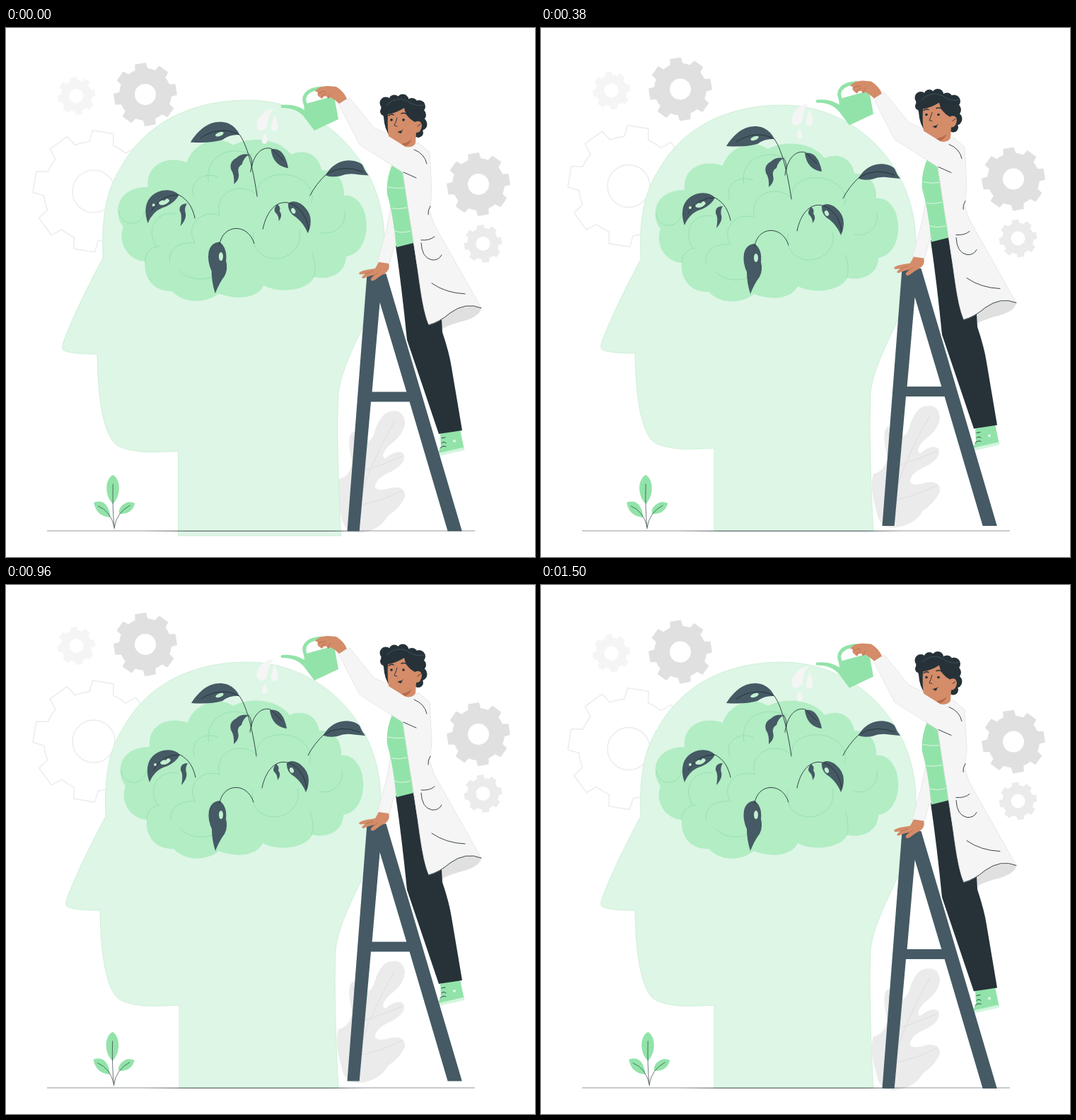
These frames come from a looping animation (748x748 px, 1540 ms). An HTML page:

```html
<!DOCTYPE html>
<html lang="en">
<head>
<meta charset="utf-8">
<title>Watering the mind</title>
<style>
html, body { margin: 0; width: 100%; height: 100%; overflow: hidden; background: #fff; }
svg { display: block; width: 100vw; height: 100vh; }
.line { fill: none; stroke: #263238; stroke-width: .9; stroke-linecap: round; }
.fine { stroke-width: .65; }
.fold { fill: none; stroke: #94dcae; stroke-width: .8; }
.vein { fill: none; stroke: #dcdcdc; stroke-width: .9; }
.leaf { fill: #455a64; }
.spot { fill: #c3f0d1; }
.mint { fill: #92e3a9; }
.skin { fill: #d48c69; }
.ink { fill: #263238; }
.coat { fill: #f5f5f5; stroke: #e2e2e2; stroke-width: .8; }
</style>
</head>
<body>
<svg viewBox="0 0 748 748">
  <g class="float">
    <g id="gears"></g>
    <path fill="#ebebeb" d="M500 714Q478 715 474 690Q464 655 470 638Q485 635 490 615Q481 580 489 572Q498 569 505 580Q512 592 520 575Q527 549 540 543Q562 537 564 558Q563 575 542 590Q528 605 536 609Q553 595 562 602Q567 615 545 627Q521 637 522 650Q528 656 545 650Q565 647 564 663Q557 679 540 690Q528 711 500 714Z"/>
    <path class="vein" d="M488 708Q508 625 550 555M506 626Q532 618 560 606M494 676Q530 670 560 654M508 622Q500 600 490 578"/>
  </g>

  <g id="head">
    <path fill="#def6e6" stroke="#c2ebcf" stroke-width=".7" d="M245 711V594C210 596 185 597 164 588C145 580 134 535 133 460C112 460 96 459 87 455Q83 453 86 444C97 413 122 362 141 327C139 280 143 237 165 203C200 139 265 109 341 109C445 109 530 195 530 304C531 340 526 365 516 387C503 421 470 476 466 516C464 570 466 640 470 711Z"/>
    <path fill="#b2edc4" d="M203 229C200 196 232 185 257 195C265 168 300 156 321 171C345 158 385 162 401 184C421 175 440 185 443 206C465 205 475 222 474 241C491 238 507 258 505 287C503 312 490 323 477 325C477 347 455 359 433 353C425 372 385 377 363 365C355 383 325 386 301 376C283 391 252 390 237 373C211 374 197 355 199 332C175 330 161 306 169 284C154 265 160 229 203 229Z"/>
    <path class="fold" d="M287 222C281 195 305 168 348 184M300 215C276 207 259 224 267 243M302 268C294 236 329 221 352 238M355 240C350 219 380 206 405 214C423 220 434 235 429 251M302 268C276 259 254 284 268 306M215 312C199 287 215 261 243 266M350 290C344 309 356 325 376 328C401 329 418 309 412 288M442 292C460 296 478 283 475 262M268 306C244 304 229 318 234 333M247 345C268 366 308 355 313 332M163 262C166 286 196 284 199 262M430 320C435 334 435 345 432 354M199 332C199 322 205 312 219 311"/>
    <g class="leaf">
      <path d="M262 167C275 147 292 134 314 141Q325 146 330 157Q316 156 306 164Q288 169 262 167Z"/>
      <path d="M373 177Q385 174 392 187Q396 196 397 203Q376 200 373 177Z"/>
      <path d="M343 184Q332 182 325 189Q315 194 318 205Q323 212 322 225Q331 218 328 208Q327 201 333 198Q335 189 343 184Z"/>
      <path d="M449 213C453 203 464 195 474 193C484 191 496 194 500 199Q503 207 508 213Q496 212 488 211Q478 210 468 214Q457 216 449 213Z"/>
      <path d="M203 279C196 260 200 240 222 234Q238 231 246 240Q241 250 228 256Q210 261 203 279Z"/>
      <path d="M257 252Q246 252 247 262Q251 268 248 283Q257 273 255 265Q253 258 257 252Z"/>
      <path d="M397 252Q403 246 414 252Q428 262 428 276Q428 285 424 293Q419 280 408 271Q396 264 397 252Z"/>
      <path d="M382 253Q376 259 379 264Q384 268 384 276Q390 269 385 262Q387 257 382 253Z"/>
      <path d="M302 305Q290 306 287 319Q285 332 291 345Q291 360 296 376Q302 361 309 352Q314 343 311 331Q313 313 302 305Z"/>
    </g>
    <g class="spot">
      <ellipse cx="302" cy="156" rx="6" ry="2.6" transform="rotate(-20 302 156)"/>
      <path d="M218 250Q222 246 226 248Q230 242 233 248Q229 254 222 254Q218 254 218 250Z"/>
      <circle cx="211" cy="254" r="2"/>
      <ellipse cx="404" cy="262" rx="2.8" ry="4" transform="rotate(-25 404 262)"/>
      <ellipse cx="304" cy="325" rx="3" ry="6"/>
    </g>
    <path class="line" d="M276 161Q304 143 330 157C342 174 350 213 354 242M345 208C348 185 360 172 374 176L390 192M343 184Q348 190 347 201M427 241Q435 225 450 211Q473 197 500 208M208 262Q222 239 246 240C259 247 265 258 268 272M362 287C367 262 381 247 398 251C413 255 424 272 425 288M302 309C306 280 341 278 350 307"/>
  </g>

  <g id="sprout">
    <path class="mint" d="M151 632C139 638 139 662 151 673C163 661 162 638 151 632ZM124 671Q134 667 141 674Q147 682 147 692Q127 690 124 671ZM182 672Q172 667 163 676Q158 682 160 687Q178 688 182 672Z"/>
    <path class="line fine" d="M151 645Q150 680 153 708M130 676Q148 683 153 706M175 675Q156 685 153 706"/>
  </g>

  <path class="ink" d="M58 710.8H663V711.2H58ZM115 711L250 710.8H470L605 711L470 711.2H250Z"/>
  <path class="ink" d="M193 711.2L270 711H460L530 711.2L460 711.5H270Z"/>

  <g class="float">
    <path fill="#f5f5f5" d="M379 114C363 116 353 130 355 140C358 149 368 145 370 136C371 127 373 120 379 114ZM380 122C383 132 387 141 382 145C375 148 373 141 376 134ZM366 150C370 156 371 163 366 164C360 164 361 156 366 150Z"/>

    <!-- legs and shoe -->
    <path class="mint" d="M614 574L642 568L648 596L613 604Q610 600 615 592Z"/>
    <path fill="#d3f5de" d="M647 593L648 597L613 605L612 601Z"/>
    <path class="line" d="M616 580L621 579M616 587Q619 584 622 587M614 594Q618 590 622 592"/>
    <circle cx="634" cy="584" r="2" fill="#def6e6"/>
    <path class="ink" d="M551 308L576 303Q584 360 596 405L616 409L617 430Q627 460 630 480L645 569L612 574L567 441Q560 370 551 308Z"/>

    <!-- coat, shirt and arms -->
    <path class="coat" d="M546 243L538 285L525 331L542 334L551 301V258Z"/>
    <path class="mint" d="M546 193Q537 215 539 235Q547 262 552 310L576 304Q569 240 561 202Z"/>
    <path fill="none" stroke="#def6e6" d="M540 225Q552 228 563 226M545 255Q555 257 567 254M549 287Q560 291 572 287"/>
    <path fill="#e0e0e0" d="M672 396Q671 407 648 414Q631 418 617 425V408Q645 389 672 396Z"/>
    <path class="coat" d="M486 99L520 141L575 166L583 162L599 176L602 232L599 258L605 277L672 396Q650 387 628 403Q613 416 598 420Q591 405 585 362Q578 310 571 270L561 204L500 165L470 107Z"/>
    <path class="line" d="M577 172Q592 178 595 192M562 204L580 212M587 300Q599 301 606 295M587 304Q588 325 602 328Q612 329 616 321M602 361Q622 375 649 376M597 264Q596 258 600 252M598 420Q613 416 628 403Q650 387 672 396"/>

    <!-- face -->
    <g class="ink" id="curls">
      <path d="M530 112L548 100L586 112L590 140L583 155L570 142L543 153Q535 143 534 126Z"/>
    </g>
    <path class="skin" d="M540 122Q552 120 563 113Q565 126 578 133Q587 129 588 138Q587 148 580 148L579 163Q575 170 565 168L541 153Q539 140 540 122Z"/>
    <path fill="#b86b4b" d="M559 164Q569 162 574 157Q571 165 564 167Z"/>
    <path fill="none" stroke="#455a64" stroke-width=".8" d="M538 109Q552 96 567 103Q579 112 591 109"/>
    <path class="line" d="M553 127Q551 134 549 138L553 139M554 147Q558 149 561 144M582 139L586 136"/>
    <path class="line" style="stroke-width:1.5" d="M541 124Q545 121 548 123M559 121Q564 119 568 123"/>
    <path class="ink" d="M555 146L560 145Q560 149 557 149Z"/>
    <circle class="ink" cx="545" cy="130" r="1.8"/>
    <circle class="ink" cx="562" cy="130" r="1.8"/>

    <!-- watering can -->
    <path fill="none" stroke="#92e3a9" stroke-width="5" d="M425 111C417 98 424 86 447 85"/>
    <path class="mint" d="M421 108L464 96L470 129L436 145L424 129C416 117 405 113 390 113Q387 111 390 109Q408 107 422 116Z"/>
    <path class="skin" d="M437 89Q443 82 455 82L467 83Q478 90 482 100L471 107Q465 101 459 98L455 100Q454 95 449 97Q447 102 444 98Q439 95 441 91Z"/>
    <path fill="none" stroke="#b86b4b" stroke-width=".8" d="M442 92L452 89M446 97L453 92M455 99L459 92"/>

    <!-- ladder -->
    <path fill="#455a64" fill-rule="evenodd" d="M510.5 347.6H537.5L644.8 711.6H624.6L570.6 528.6H516L499.7 711.6H482.5ZM528.6 388L517.6 514.6H566.3Z"/>
    <path class="skin" d="M527 331L541 333Q544 341 536 347Q529 350 522 356Q515 360 516 354L521 349Q512 351 506 354Q501 354 505 350L509 347Q500 350 499 347Q500 344 510 342L522 340Z"/>
    <path fill="none" stroke="#b86b4b" stroke-width=".8" d="M507 348L519 344M519 351L526 346"/>
  </g>
</svg>
<script>
const LOOP = 1540;
const floats = document.querySelectorAll(".float");
const head = document.getElementById("head");
const sprout = document.getElementById("sprout");

function ring(cx, cy, r) {
  return `M${cx - r} ${cy}a${r} ${r} 0 1 0 ${2 * r} 0a${r} ${r} 0 1 0 ${-2 * r} 0Z`;
}

// eight teeth; tilt is the angle of one tooth in degrees
function gear(cx, cy, r, hole, tilt, paint) {
  const at = (deg, rad) => {
    const a = deg * Math.PI / 180;
    return (cx + rad * Math.cos(a)).toFixed(1) + " " + (cy + rad * Math.sin(a)).toFixed(1);
  };
  const root = r * 0.82;
  let d = "";
  for (let i = 0; i < 8; i++) {
    const a = tilt + i * 45;
    d += `${i ? "L" : "M"}${at(a - 14, root)}L${at(a - 10, r)}L${at(a + 10, r)}L${at(a + 14, root)}`;
    d += `A${root} ${root} 0 0 1 ${at(a + 31, root)}`;
  }
  return `<path fill-rule="evenodd" ${paint} d="${d}Z${ring(cx, cy, hole)}"/>`;
}

document.getElementById("gears").innerHTML =
  gear(124, 231, 86, 30, -81, 'fill="#fff" stroke="#ebebeb" stroke-width="1.4"') +
  gear(197, 94, 45, 15, -99, 'fill="#e0e0e0"') +
  gear(99.5, 96, 27, 10, -99, 'fill="#f5f5f5"') +
  gear(668, 221, 45, 15, -99, 'fill="#e0e0e0"') +
  gear(674.5, 305, 27, 10, -99, 'fill="#ebebeb"');

const curls = [[537, 106, 8.5], [549, 102, 7.5], [561, 102, 8.5], [574, 107, 8],
  [584, 111, 9], [585, 123, 9], [586, 136, 9.5], [583, 148, 7], [535, 118, 6]];
document.getElementById("curls").innerHTML +=
  curls.map(([x, y, r]) => `<circle cx="${x}" cy="${y}" r="${r}"/>`).join("");

// cubic-bezier(.25, .1, .25, 1)
function ease(x) {
  if (x <= 0) return 0;
  if (x >= 1) return 1;
  let lo = 0, hi = 1, s = x;
  for (let i = 0; i < 20; i++) {
    s = (lo + hi) / 2;
    const bx = 0.75 * s * (1 - s) + s * s * s;
    if (bx < x) lo = s; else hi = s;
  }
  return 0.3 * s * (1 - s) * (1 - s) + 3 * s * s * (1 - s) + s * s * s;
}

function beat(t, start, peak, end) {
  return t < peak ? ease((t - start) / (peak - start)) : 1 - ease((t - peak) / (end - peak));
}

const SHAKE = [0, -1.5, 3, -6, 6, -6, 6, -6, 3, -1.5, 0];

function draw(now) {
  const t = now % LOOP;

  const p = ((t + 35) % LOOP) / LOOP;
  const lift = 15 * (1 - Math.abs(1 - 2 * p));
  floats.forEach(g => g.setAttribute("transform", `translate(0 ${(0.6 - lift).toFixed(2)})`));

  const u = t > LOOP - 34 ? t - LOOP : t;
  const s = 1 + 0.1 * Math.max(beat(u, -34, 170, 378), beat(u, 677, 827, 967));
  head.setAttribute("transform", `translate(307 410) scale(${s.toFixed(4)}) translate(-307 -410)`);

  const k = ((t + 25) % 1500) / 150, i = Math.floor(k);
  const x = 0.5 + SHAKE[i] + (SHAKE[i + 1] - SHAKE[i]) * (k - i);
  sprout.setAttribute("transform", `translate(${x.toFixed(2)} 0)`);
}

const began = performance.now();
function tick() {
  draw(performance.now() - began);
  requestAnimationFrame(tick);
}
tick();
</script>
</body>
</html>
```
